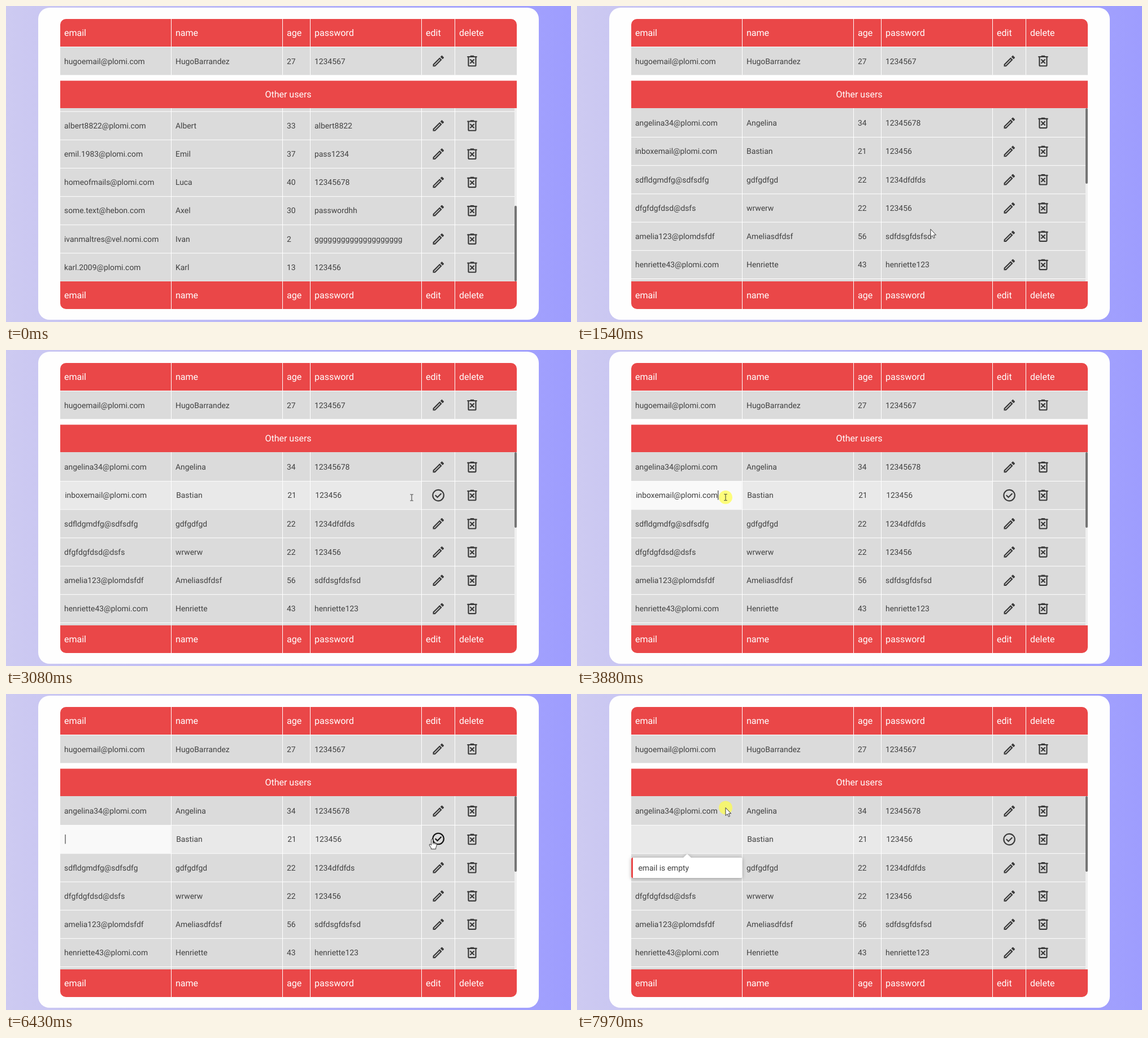
Animation, 1000 px wide and 560 px high, one loop 8000 ms. Source, as an HTML page:

```html
<!DOCTYPE html>
<html lang="en">
<head>
<meta charset="utf-8">
<title>User table</title>
<style>
  html, body { margin: 0; width: 100%; height: 100%; overflow: hidden; }
  svg { display: block; width: 1000px; height: 560px; }
  text { font: 13.87px Roboto, sans-serif; fill: #404040; text-rendering: geometricPrecision; white-space: pre; }
  .head { font-size: 16px; fill: #fff; }
  .icon { fill: #3a3a3a; }
  .red { fill: #ea4748; }
  .gray { fill: #dbdbdb; }
  .white { fill: #fff; }
  #tip { filter: drop-shadow(0 1px 3px rgba(0, 0, 0, .3)); }
</style>
</head>
<body>
<svg viewBox="0 0 1000 560">
  <defs>
    <linearGradient id="sky"><stop stop-color="#cdcaf1"/><stop offset="1" stop-color="#9e9dfe"/></linearGradient>
    <clipPath id="view"><rect x="96" y="181" width="808" height="307"/></clipPath>
    <clipPath id="selClip"><rect id="selArea" y="249" height="17"/></clipPath>
    <path id="pencil" d="M14.06 9.02l.92.92L5.92 19H5v-.92l9.06-9.06M17.66 3c-.25 0-.51.1-.7.29l-1.83 1.83 3.75 3.75 1.83-1.83c.39-.39.39-1.02 0-1.41l-2.34-2.34c-.2-.2-.45-.29-.71-.29zm-3.6 3.19L3 17.25V21h3.75L17.81 9.94z"/>
    <path id="bin" fill-rule="evenodd" d="M9.4 16.5L12 13.9l2.6 2.6 1.4-1.4-2.6-2.6L16 9.9l-1.4-1.4-2.6 2.6-2.6-2.6L8 9.9l2.6 2.6L8 15.1zM7 21q-.825 0-1.412-.587T5 19V6H4V4h5V3h6v1h5v2h-1v13q0 .825-.587 1.413T17 21zM17 6H7v13h10z"/>
    <path id="check" fill-rule="evenodd" d="M10.6 16.6l7.05-7.05-1.4-1.4-5.65 5.65-2.85-2.85-1.4 1.4zM12 2a10 10 0 0 1 0 20 10 10 0 0 1 0-20zm0 2a8 8 0 0 0 0 16 8 8 0 0 0 0-16z"/>
  </defs>
  <rect width="1000" height="560" fill="url(#sky)"/>
  <rect x="57" y="3" width="886" height="553" rx="20" fill="#fefefe"/>
  <g id="fixed"></g>
  <g clip-path="url(#view)">
    <rect class="gray" x="96" y="181" width="804" height="307"/>
    <g id="list"></g>
    <rect x="900" y="181" width="4" height="307" fill="#f0f0f0"/>
    <rect id="thumb" x="900" width="4" height="134" rx="2" fill="#757575"/>
  </g>
  <g id="tip">
    <path class="white" d="M96 290H188L195 283.5 202 290H290a2.5 2.5 0 0 1 2.5 2.5V323.5a2.5 2.5 0 0 1-2.5 2.5H96z"/>
    <path class="red" d="M99 290v36h-.5a2.5 2.5 0 0 1-2.5-2.5V292.5a2.5 2.5 0 0 1 2.5-2.5z"/>
    <text x="108.5" y="313.3">email is empty</text>
  </g>
  <g id="pointer" stroke-width=".9" stroke="#222" fill="#fff">
    <circle id="press" r="12" fill="#ffff46" fill-opacity=".7" stroke="none"/>
    <path id="arrow" d="M0 0V14L3.2 11.2 5.4 16 7.5 15 5.4 10.3H9.7z"/>
    <g id="hand">
      <path d="M-1.5 1Q0-.8 1.5 1V6.3L6.5 7.3Q8 7.7 8 9.5 8 13 6.4 15.5V17.8H-1.8V15.8L-5 11Q-5.4 8.6-3.4 9.3L-1.5 11z"/>
      <path d="M1.5 6V9.2M3.8 6.8V9.4M6 7.3V9.7" fill="none"/>
    </g>
    <path id="beam" fill="none" d="M-2.7-5.5H-.7L0-5 .7-5.5H2.7M0-5V5M-2.7 5.5H-.7L0 5 .7 5.5H2.7"/>
  </g>
</svg>
<script>
const $ = id => document.getElementById(id);
const PITCH = 50.2, MAX_SCROLL = 396.9, LOOP = 8000;
const COLS = [96, 293, 490, 539, 736, 795];
const HEADS = ['email', 'name', 'age', 'password', 'edit', 'delete'];
const USERS = [
  ['angelina34@plomi.com', 'Angelina', 34, '12345678'],
  ['inboxemail@plomi.com', 'Bastian', 21, '123456'],
  ['sdfldgmdfg@sdfsdfg', 'gdfgdfgd', 22, '1234dfdfds'],
  ['dfgfdgfdsd@dsfs', 'wrwerw', 22, '123456'],
  ['amelia123@plomdsfdf', 'Ameliasdfdsf', 56, 'sdfdsgfdsfsd'],
  ['henriette43@plomi.com', 'Henriette', 43, 'henriette123'],
  ['tildawork@plomi.com', 'Tilda', 43, 'qwertyuiop'],
  ['bastiankrtz@plomi.com', 'Bastian', 22, 'bastiankrtz2'],
  ['albert8822@plomi.com', 'Albert', 33, 'albert8822'],
  ['emil.1983@plomi.com', 'Emil', 37, 'pass1234'],
  ['homeofmails@plomi.com', 'Luca', 40, '12345678'],
  ['some.text@hebon.com', 'Axel', 30, 'passwordhh'],
  ['ivanmaltres@vel.nomi.com', 'Ivan', 2, 'g'.repeat(20)],
  ['karl.2009@plomi.com', 'Karl', 13, '123456'],
];

const rect = (x, y, w, h, extra) => `<rect x="${x}" y="${y}" width="${w}" height="${h}" ${extra}/>`;
const text = (x, y, s, extra = '') => `<text x="${x}" y="${y}" ${extra}>${s}</text>`;
const icon = (name, x, y, extra = '') =>
  `<g transform="translate(${x - 13} ${y - 13}) scale(1.083)"><use href="#${name}" class="icon" ${extra}/></g>`;
const lines = (y, h) => COLS.slice(1).map(x => rect(x - 1, y, 1, h, 'class="white"')).join('');
const cells = (values, y, dx, extra) => values.map((s, i) => text(COLS[i] + 7 + dx, y, s, extra)).join('');
const header = (y, shape) => `<path class="red" d="${shape}"/>` + lines(y, 49) + cells(HEADS, y + 30, 0, 'class="head"');

$('fixed').innerHTML =
  header(23, 'M96 72V33a10 10 0 0 1 10-10H894a10 10 0 0 1 10 10V72z') +
  rect(96, 73, 808, 49.3, 'class="gray"') + lines(73, 49.3) +
  cells(['hugoemail@plomi.com', 'HugoBarrandez', 27, '1234567'], 102.5, 0) +
  icon('pencil', 765.3, 97.6) + icon('bin', 825, 97.6) +
  rect(96, 132.4, 808, 48.6, 'class="red"') +
  text(499.5, 162.3, 'Other users', 'class="head" text-anchor="middle"') +
  header(488, 'M96 488V527a10 10 0 0 0 10 10H894a10 10 0 0 0 10-10V488z');

// The second row swaps between plain cells and input fields.
const row = (user, i) => {
  const mid = 207.2 + i * PITCH, edit = i === 1;
  return (edit ? `<g id="plain">${cells(user, mid + 4.9, 0)}</g>` : cells(user, mid + 4.9, 0)) +
    icon('pencil', 765.3, mid + .2, edit ? 'id="editIcon"' : '') +
    icon('bin', 825, mid + .2) + rect(96, mid + 24.8, 804, 1, 'class="white"');
};
const fields = COLS.slice(0, 4).map((x, i) => rect(x, 232.8, COLS[i + 1] - x - 1, 49.3, 'fill="#e9e9e9"')).join('');
$('list').innerHTML = lines(181, 710) + USERS.map(row).join('') +
  `<g id="inputs">${fields}${rect(96, 232.8, 195.5, 49.3, 'id="focus" fill="#f9f9f9"')}
    ${cells(USERS[1], 262.3, 1.2)}
    <g id="picked" clip-path="url(#selClip)">${rect(96, 249, 195, 17, 'fill="#0078d7"')}
      ${text(104.2, 262.3, USERS[1][0], 'class="white"')}</g>
    ${rect(104.5, 249, 1, 16.5, 'id="caret" fill="#222"')}
  </g>` + icon('check', 765.1, 257.6, 'id="okIcon"');

const email = $('inputs').querySelector('text');
const clamp = v => Math.max(0, Math.min(1, v));
const ramp = (t, a, b) => clamp((t - a) / (b - a));
const smooth = u => u * u * (3 - 2 * u);
const within = (v, a, b) => v >= a && v < b;
const show = (id, on) => $(id).style.display = on ? '' : 'none';
const set = (id, name, v) => $(id).setAttribute(name, v);

const PATH = [
  [400, 880, 562], [730, 565, 449], [1350, 565, 449], [1870, 778.2, 261.6],
  [2990, 778.2, 261.6], [3350, 263, 261], [4010, 263, 261], [4290, 64.5, 247.5],
  [5570, 64.5, 247.5], [6400, 754.3, 257], [7050, 754.3, 257], [7700, 263, 201.5],
];
const PRESSES = [[2290, 2390], [3680, 4430], [6490, 6590], [7970, LOOP]];

function pointerAt(t) {
  const i = PATH.findIndex(k => k[0] > t);
  if (i < 0) return PATH[PATH.length - 1].slice(1);
  const b = PATH[i], a = PATH[i - 1] || b;
  const u = a === b ? 0 : smooth(ramp(t, a[0], b[0]));
  return [a[1] + (b[1] - a[1]) * u, a[2] + (b[2] - a[2]) * u];
}

function draw(t) {
  const tick = Math.floor((t + 7) / 1000 * 15) * 1000 / 15;  // motion runs at 15 steps a second
  const [x, y] = pointerAt(tick);
  const editing = t >= 2340;

  const scroll = 1 - smooth(ramp(tick, 870, 1133));
  set('list', 'transform', `translate(0 ${-scroll * MAX_SCROLL})`);
  set('thumb', 'y', 181 + scroll * 173);

  const onIcon = tick > 1350 && within(x, 753, 779) && within(y, 245, 271);
  const onInput = editing && within(x, 96, 735) && within(y, 233, 282);
  set('pointer', 'transform', `translate(${x} ${y})`);
  show('hand', onIcon);
  show('beam', onInput);
  show('arrow', !onIcon && !onInput);
  show('press', PRESSES.some(p => within(t, ...p)));

  show('plain', !editing);
  show('editIcon', !editing);
  show('okIcon', editing);
  set('inputs', 'opacity', editing ? ramp(t, 2300, 2420) : 0);
  set('okIcon', 'opacity', .7 + .3 * ramp(t, 2340, 2520));
  for (const id of ['editIcon', 'okIcon']) {
    const hover = onIcon && (!editing || t > 2520);
    $(id).style.fill = hover ? '#111' : '';
    set(id, 'transform', `translate(0 ${hover ? -1 : 0})`);
  }
  set('focus', 'opacity', ramp(t, 3680, 3800) * (1 - ramp(t, 6490, 6700)));

  const cleared = t >= 5100, end = 104.2 + email.getComputedTextLength();
  const from = Math.max(104.5, Math.min(x, end));
  show('picked', t >= 4010 && !cleared && from < end);
  set('selArea', 'x', from);
  set('selArea', 'width', end - from);
  email.style.display = cleared ? 'none' : '';
  show('caret', within(t, 3680, 4080) || within(t, 5100, 6560));
  set('caret', 'x', cleared ? 104.5 : end);

  set('tip', 'opacity', ramp(t, 6520, 6700));
}

(function loop() {
  draw(performance.now() % LOOP);
  requestAnimationFrame(loop);
})();
</script>
</body>
</html>
```
